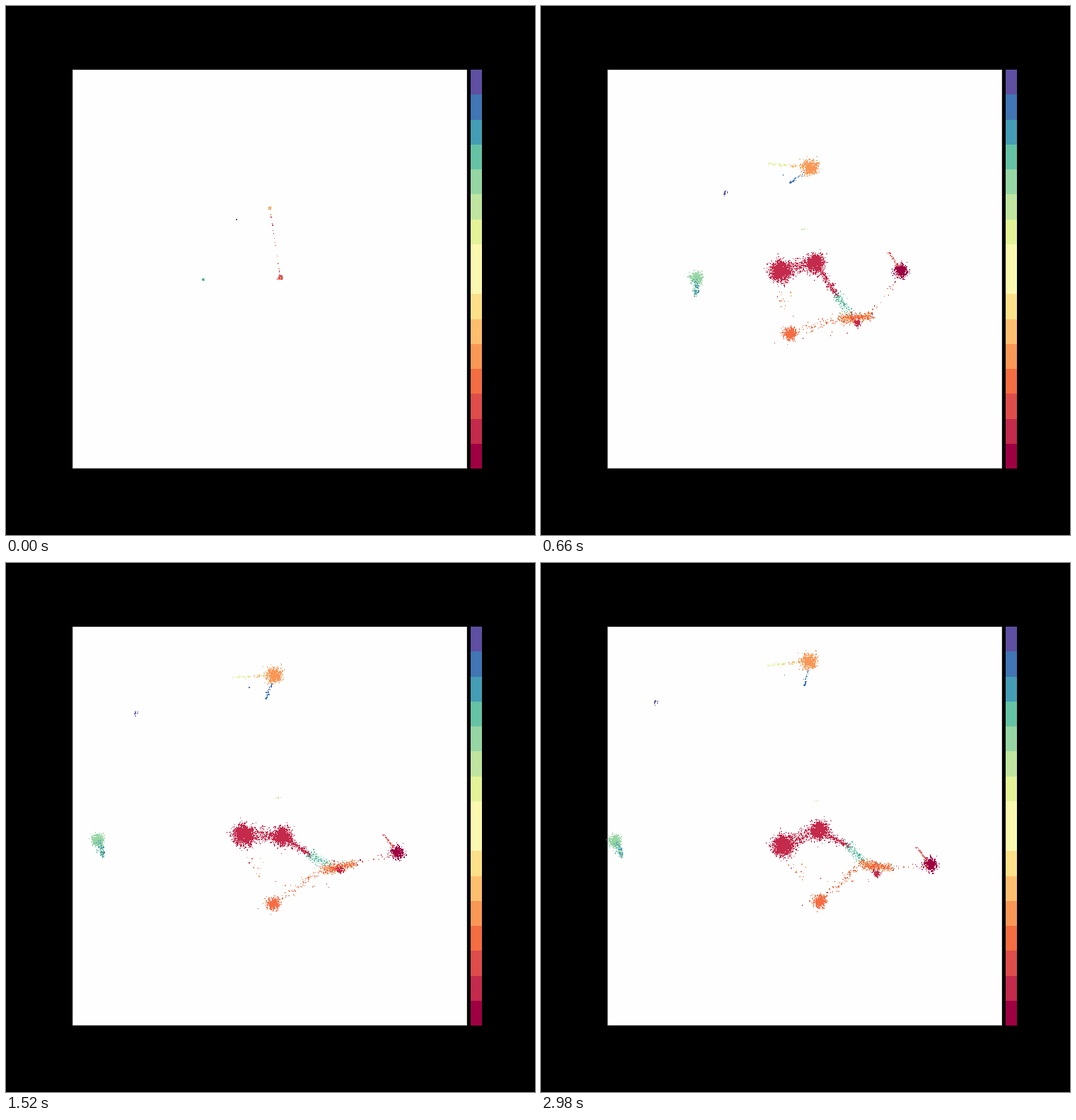
Write a matplotlib script that moves like this. It is 748x748 px and loops after 3030 ms.

```python
import numpy as np
import matplotlib.pyplot as plt
from matplotlib.animation import FuncAnimation
from matplotlib.patches import Rectangle

SIZE, DPI = 748, 100
TICK, LOOP = 10, 3030
STEPS, BURST, SETTLE = 149, 20, 97
PALE = "#fbf8b0"
COLORS = ["#9e0142", "#c32a4b", "#de4d4a", "#f46d43", "#f99856", "#fdbf6f",
          "#fde08a", PALE, PALE, "#e4f398", "#bfe5a0", "#96d5a4",
          "#66c2a5", "#449db4", "#4175b4", "#5e4fa2"]

# Seeds from which the clusters burst
NORTH, SOUTH, WEST, FAR = (373, 286), (388, 384), (279, 387), (326, 302)

rng = np.random.default_rng(7)
step = np.arange(STEPS)[:, None]
grow = 1 - (1 - np.clip(step / BURST, 0, 1)) ** 2
u = np.clip((step - BURST) / (SETTLE - BURST), 0, 1)
settle = 1 - (1 - u) ** 1.4
swing = np.sin(np.pi * u)
parts = []


def node(seed, burst, rest, sway=(0, 0)):
    """Burst out of a seed, then ease to rest, bending sideways on the way."""
    seed, burst, rest, sway = map(np.array, (seed, burst, rest, sway))
    return seed + (burst - seed) * grow + (rest - burst) * settle + sway * swing


def arm(hub, length, start, end):
    """A point that circles its hub from one angle to another."""
    ang = np.radians(start + (end - start) * settle)
    return hub + length * grow * np.hstack([np.cos(ang), np.sin(ang)])


def link(a, b, n, w0, w1, hues, lo=0.0, hi=1.0, bias=1.0):
    """Dots strewn from a to b, the band going from width w0 to w1."""
    v = rng.random((n, 1)) ** bias
    noise = rng.normal(size=(n, 2)) * (w0 + (w1 - w0) * v)
    parts.append((a, b, lo + (hi - lo) * v, noise, rng.choice(hues, n)))


def blob(a, n, width, hues):
    link(a, a, n, width, width, hues)


red_l = node(SOUTH, (342, 377), (342, 400), (-8, -14))
red_r = node(SOUTH, (387, 350), (393, 378), (-2, 17))
teal = node(SOUTH, (417, 404), (436, 401), (-3, 15))
low = node(SOUTH, (347, 453), (394, 478), (-10, 10))
mid_a = node(SOUTH, (415, 443), (453, 426), (1, 7))
mid_b = node(SOUTH, (455, 448), (494, 431), (6, -11))
right = node(NORTH, (488, 366), (551, 427), (17, -9))
top = node(NORTH, (381, 252), (379, 139))
violet = node(FAR, (286, 283), (161, 198))
green = node(WEST, (251, 382), (105, 393))
olive = node(NORTH, (369, 310), (390, 337))

patch = arm(mid_b, 21, 152, 157)
spur = arm(right, 32, 238, 232)
yellow = arm(top, 58, 188, 174)
blue = arm(top, 35, 153, 100)
blue_dot = arm(top, 40, 167, 151)
tail = arm(green, 25, 101, 67)

blob(red_l, 1300, 6.8, [1])
link(red_l, red_r, 330, 5.5, 5, [1])
blob(red_r, 950, 6.3, [1])
link(red_r, teal, 260, 4.5, 1.2, [1])
link(teal, patch, 140, 3.4, 2.6, [12] * 9 + [11, 13], 0, 0.7, 1.5)
blob(low, 400, 4.1, [3])
link(low, mid_a, 75, 3, 3.5, [3])
link(mid_a, mid_b, 470, 3.6, 3.2, [3] * 16 + [4, 5, 5, 9, 12, 2])
blob(patch, 75, 2.4, [1])
blob(right, 440, 4.3, [0])
link(spur, right, 38, 0.8, 0.8, [2], 0, 0.75)
link(mid_b, right, 24, 2, 2, [0, 1, 2, 3])
blob(top, 570, 5, [4])
link(yellow, top, 36, 0.9, 1, [9], 0, 0.45)
link(yellow, top, 30, 1, 1.5, [5, 4, 9], 0.35, 0.9)
link(blue, top, 34, 0.7, 1.2, [14], 0, 0.6, 1.8)
blob(blue_dot, 1, 0.3, [14])
blob(violet, 12, 1.3, [15])
blob(green, 390, 4.3, [11])
link(green, tail, 130, 3.5, 1.3, [11, 11, 11, 12, 13, 13, 14], 0.2)
blob(olive, 4, 1.5, [5, 9, 10])
link(red_l, low, 16, 7, 7, [3, 1, 4], 0.2, 0.6)
link(low, mid_a, 14, 14, 14, [3, 3, 1, 4])

A, B = (np.concatenate([np.repeat(p[k][:, None], len(p[2]), 1) for p in parts], 1)
        for k in (0, 1))
along, noise, hue = (np.concatenate([p[k] for p in parts]) for k in (2, 3, 4))
phase = rng.uniform(0, 2 * np.pi, noise.shape)
speed = rng.uniform(0.2, 0.9, noise.shape)


def positions(s):
    calm = 1 - s / (STEPS - 1)
    shake = 0.7 * grow[s] * calm * np.sin(speed * s + phase)
    spread = 0.12 + 0.88 * grow[s]
    return A[s] + (B[s] - A[s]) * along + noise * spread + shake


fig = plt.figure(figsize=(SIZE / DPI, SIZE / DPI), dpi=DPI, facecolor="black")
ax = fig.add_axes([0, 0, 1, 1])
ax.set(xlim=(0, SIZE), ylim=(SIZE, 0))
ax.axis("off")
ax.add_patch(Rectangle((94.5, 90.5), 557, 563, fc="#fefefe", ec="#cccccc",
                       lw=72 / DPI, snap=False))
slot = 564 / len(COLORS)
for i, color in enumerate(COLORS):
    ax.add_patch(Rectangle((657, 654 - (i + 1) * slot), 16, slot, fc=color, lw=0))

dots = ax.scatter(*positions(0).T, s=(1.3 * 72 / DPI) ** 2, marker="s",
                  c=[COLORS[h] for h in hue], linewidths=0, zorder=3)


def update(i):
    dots.set_offsets(positions(int(np.clip(i * TICK // 20 - 1, 0, STEPS - 1))))
    return dots,


anim = FuncAnimation(fig, update, frames=LOOP // TICK, interval=TICK,
                     repeat=True, repeat_delay=0, blit=False)
plt.show()
```
